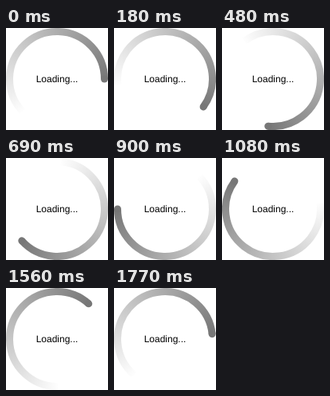
Write an HTML page with a canvas that moves like this. It is 128 by 128 pixels and loops after 1800 ms.

```html
<!DOCTYPE html>
<html lang="en">
<head>
<meta charset="utf-8">
<title>Loading</title>
<style>
  html, body { margin: 0; width: 100%; height: 100%; overflow: hidden; background: #fff; }
  canvas { display: block; }
</style>
</head>
<body>
<canvas id="stage" width="128" height="128"></canvas>
<script>
  const ctx = document.getElementById('stage').getContext('2d');
  const LOOP = 1800, STEP = 30, RADIUS = 59.5, WIDTH = 9;
  const SPAN = Math.PI * 5 / 4;
  const HEAD = '#777';

  // The tail fades out behind a head that sits at angle 0.
  const fade = ctx.createConicGradient(-SPAN, 0, 0);
  fade.addColorStop(0, '#fff');
  fade.addColorStop(SPAN / (2 * Math.PI), HEAD);
  fade.addColorStop(1, HEAD);

  ctx.font = '12px "Liberation Sans", Arial, sans-serif';
  ctx.textRendering = 'geometricPrecision';
  ctx.textAlign = 'center';
  ctx.lineWidth = WIDTH;

  function draw(time) {
    const step = Math.floor(time % LOOP / STEP);
    ctx.fillStyle = '#fff';
    ctx.fillRect(0, 0, 128, 128);

    ctx.save();
    ctx.translate(64, 64);
    ctx.rotate(step * STEP / LOOP * 2 * Math.PI);
    ctx.strokeStyle = fade;
    ctx.beginPath();
    // Start just inside the fade so its seam stays hidden.
    ctx.arc(0, 0, RADIUS, 0.03 - SPAN, 0);
    ctx.stroke();
    ctx.fillStyle = HEAD;
    ctx.beginPath();
    ctx.arc(RADIUS, 0, WIDTH / 2, 0, 2 * Math.PI);
    ctx.fill();
    ctx.restore();

    ctx.fillStyle = '#000';
    ctx.fillText('Loading...', 64, 67.5);
  }

  const start = performance.now();
  function tick() {
    draw(performance.now() - start);
    requestAnimationFrame(tick);
  }
  tick();
</script>
</body>
</html>
```
